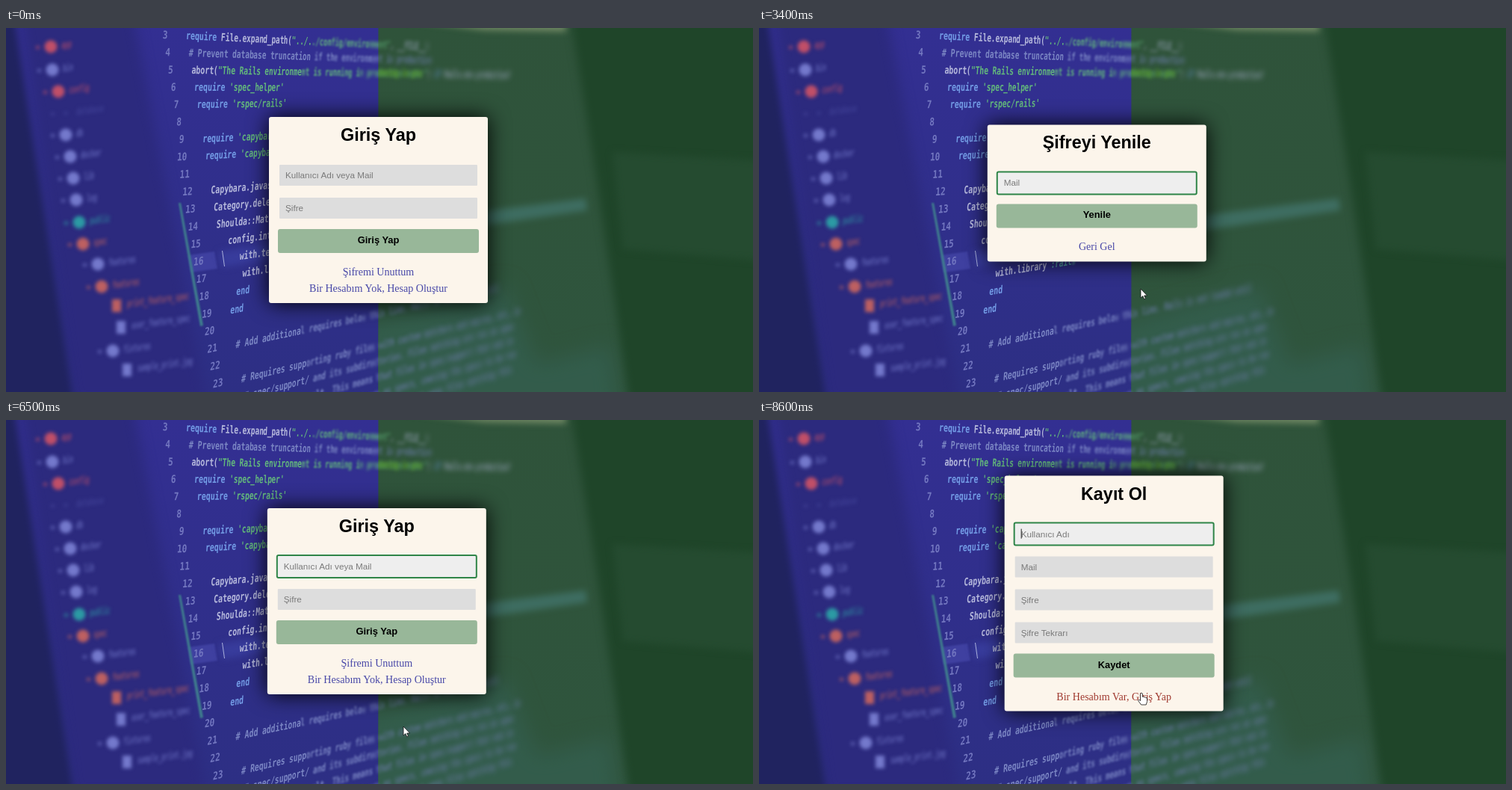
Write an HTML page with a canvas that moves like this. It is 1000x487 px and loops after 8700 ms.

```html
<!DOCTYPE html>
<html lang="tr">
<head>
<meta charset="utf-8">
<title>Giriş Yap</title>
<style>
  html, body { margin: 0; width: 100%; height: 100%; overflow: hidden; background: #2f2e88; }
  canvas { position: absolute; left: 0; top: 0; }
  .card {
    position: absolute; left: 352px; width: 293px; box-sizing: border-box; padding: 0 12px 9px;
    background: #fcf5eb; border-radius: 3px; box-shadow: 0 0 29px #000;
    font: 11.7px "Liberation Sans", Arial, sans-serif; text-align: center;
  }
  h1 { margin: 0; height: 62px; font-size: 23.4px; line-height: 49px; color: #000; }
  .field {
    position: relative; box-sizing: border-box; height: 32px; margin-bottom: 12px; padding-left: 8px;
    border: 2px solid #fcf5eb; border-radius: 3px; background: #ddd; color: #7a7a7a;
    line-height: 28px; text-align: left;
  }
  .field i { position: absolute; left: 8px; top: 7px; width: 1px; height: 13px; background: #222; visibility: hidden; }
  .button {
    height: 32px; margin-bottom: 14px; border-radius: 3px; background: #98b799;
    font-weight: bold; font-size: 12.9px; line-height: 30px; color: #000;
  }
  .link { height: 22px; font: 14.05px/22px "Liberation Serif", Times, serif; color: #4848a8; }
  #pointer { position: absolute; left: 0; top: 0; overflow: visible; }
  #pointer path { fill: #fff; stroke: #111; stroke-width: .8; stroke-linejoin: round; }
</style>
</head>
<body>
<canvas id="photo" width="1000" height="487"></canvas>
<svg id="pointer" width="14" height="18">
  <path id="arrow" d="M0 0V12.2L2.8 9.6L4.7 13.8L6.5 13L4.7 9H8.6Z"/>
  <path id="hand" d="M-1.4 1Q0-.8 1.4 1V5.4Q2.8 4.6 3.6 5.9Q5 5.2 5.7 6.5Q7.4 6 7.6 8V11.5L6.2 16H-.4L-4.4 10.6Q-4 8.4-1.4 10.6Z"/>
  <path id="beam" d="M-2-6H2M0-6V6M-2 6H2"/>
</svg>
<script>
const $ = id => document.getElementById(id);
const LOOP = 8700, SLIDE = 1970, SPLIT = 498.5;

/* ---------- backdrop ---------- */
const ctx = $('photo').getContext('2d');

function poly(color, blur, ...pts) {
  ctx.filter = blur ? `blur(${blur}px)` : 'none';
  ctx.fillStyle = color;
  ctx.beginPath();
  for (let i = 0; i < pts.length; i += 2) ctx.lineTo(pts[i], pts[i + 1]);
  ctx.fill();
}

function wash(x, top, bottom) {
  const g = ctx.createLinearGradient(0, 0, 0, 487);
  g.addColorStop(0, top);
  g.addColorStop(1, bottom);
  ctx.fillStyle = g;
  ctx.filter = 'none';
  ctx.fillRect(x, 0, 1000 - x, 487);
}

function clipRight(draw) {
  ctx.save();
  ctx.beginPath();
  ctx.rect(SPLIT, 0, 1000 - SPLIT, 487);
  ctx.clip();
  draw();
  ctx.restore();
}

function label(text, x, y, slope, width, color, blur) {
  ctx.save();
  ctx.filter = `blur(${blur}px)`;
  ctx.transform(width, width * slope, -.08, 1.2, x, y);
  ctx.font = 'bold 12px "DejaVu Sans Mono", monospace';
  ctx.textBaseline = 'middle';
  ctx.fillStyle = color;
  ctx.fillText(text, 0, 0);
  ctx.restore();
}

const code = `require File.expand_path("../../config/environment", __FILE__)
# Prevent database truncation if the environment is production
abort("The Rails environment is running in production mode!") if Rails.env.production?
require 'spec_helper'
require 'rspec/rails'

require 'capybara/rspec'
require 'capybara/rails'

Capybara.javascript_driver = :webkit
Category.delete_all; Category.generate
Shoulda::Matchers.configure do |config|
  config.integrate do |with|
    with.test_framework :rspec
    with.library :rails
  end
end

# Add additional requires below this line. Rails is not loaded until

# Requires supporting ruby files with custom matchers and macros, etc, in
# spec/support/ and its subdirectories. Files matching are run as spec
# files by default. This means that files in spec/support that end in
# will both be required and run as specs, causing the specs to be run
# twice. It is recommended that you do not name files matching this`.split('\n');

const token = /#.*|"[^"]*"|'[^']*'|(?<!:):\w+|\w+|\s+|./g;
function tint(word) {
  if (word[0] === '#') return '#7b86c4';
  if (/^["']/.test(word)) return '#63b87c';
  if (/^:\w/.test(word)) return '#58a8ac';
  return /^(require|do|end|if)$/.test(word) ? '#739ce6' : '#b6b9dc';
}

function codeLine(text, i) {
  const nx = 211 + 3.7 * i, ny = 10 + 23.4 * i, slope = .045 - .0145 * i;
  label(String(i + 3).padStart(2), nx - 8, ny, slope, .92, '#7377c0', .7);
  let col = 0;
  for (const [word] of text.matchAll(token)) {
    for (const part of word.match(/.{1,5}/g)) {
      const dx = 30 + col * (5.95 - .0115 * col);
      const x = nx + dx;
      const blur = .5 + Math.min(3, Math.max(0, x - 370) / 75);
      if (part.trim()) label(part, x, ny + slope * dx, slope, (5.95 - .021 * col) / 7.22, tint(word), blur);
      col += part.length;
    }
  }
}

const tree = [
  [60, 25, 'app', 'r'], [62, 56, 'bin', 'b'], [70, 85, 'config', 'r'], [80, 114, 'database', 'd'],
  [80, 143, 'db', 'b'], [86, 172, 'docker', 'b'], [90, 201, 'lib', 'b'], [94, 230, 'log', 'b'],
  [98, 260, 'public', 't'], [103, 289, 'spec', 'o'], [123, 316, 'features', 'b'], [128, 346, 'features', 'o'],
  [148, 371, 'print_feature_spec', 'o'], [154, 400, 'user_feature_spec', 'b'],
  [143, 432, 'fixtures', 'b'], [162, 457, 'sample_print.jpg', 'b']
];
const treeColor = { r: '#c04f68', b: '#7479cc', d: '#43459a', t: '#2c9aa4', o: '#bd6061' };

function treeRow([x, y, name, kind]) {
  const color = treeColor[kind], file = name.includes('_');
  ctx.filter = 'blur(2.8px)';
  ctx.fillStyle = color;
  ctx.beginPath();
  if (file) ctx.rect(x - 6, y - 8, 12, 17);
  else ctx.arc(x, y, kind === 'd' ? 2 : 8.5, 0, 7);
  ctx.fill();
  ctx.globalAlpha = .7;
  if (!file) ctx.fillRect(x - 20, y - 1, 5, 4);
  label(name, x + 14, y - 1, -.13, .64, color, 2);
  ctx.globalAlpha = 1;
}

function paintPhoto() {
  wash(0, '#332f92', '#2d2f84');
  poly('#2c2a7e', 8, 20, -20, 170, -20, 268, 500, 90, 500);
  poly('#20235f', 5, -20, -20, 10, -20, 92, 510, -20, 510);
  poly('#3f40a0', 1, 244, 304, 279, 299, 283, 322, 247, 327);
  poly('#383c9c', 5, 285, 300, 510, 263, 510, 281, 290, 320);
  poly('#3f7d8d', .8, 231, 234, 234, 234, 264, 398, 260, 399);
  tree.forEach(treeRow);

  wash(SPLIT, '#30543a', '#30563f');
  clipRight(() => {
    poly('#467a74', 4, 480, 265, 776, 228, 778, 244, 480, 287);
    poly('#356154', 14, 470, 400, 670, 345, 710, 450, 810, 425, 820, 520, 470, 520);
  });
  code.forEach(codeLine);
  poly('#aab0dc', .5, 289, 298, 290, 298, 293, 319, 292, 319);
  clipRight(() => {
    poly('rgba(48,84,60,.33)', 0, 490, 0, 1000, 0, 1000, 487, 490, 487);
    label('running in pro', 494, 60, .03, .62, '#5aa327', 2.8);
    poly('#1f4529', 6, 755, -20, 1020, -20, 1020, 510, 836, 510, 790, 200);
    poly('#254b30', 5, 812, 166, 1020, 178, 1020, 312, 826, 296);
    poly('#6f8763', 4, 520, -12, 748, -12, 750, 5, 640, 3);
  });
}

/* ---------- cards ---------- */
function makeCard(title, fields, button, links) {
  const el = document.createElement('div');
  el.className = 'card';
  const row = (cls, text) => `<div class="${cls}">${text}</div>`;
  el.innerHTML = `<h1>${title}</h1>` +
    fields.map(f => row('field', f + '<i></i>')).join('') +
    row('button', button) + links.map(l => row('link', l)).join('');
  document.body.insertBefore(el, $('pointer'));
  const all = s => [...el.querySelectorAll(s)];
  return {
    el, fields: all('.field'), button: all('.button')[0], links: all('.link'),
    top: (487 - (117 + 44 * fields.length + 22 * links.length)) / 2
  };
}

const login = makeCard('Giriş Yap', ['Kullanıcı Adı veya Mail', 'Şifre'], 'Giriş Yap',
  ['Şifremi Unuttum', 'Bir Hesabım Yok, Hesap Oluştur']);
const renew = makeCard('Şifreyi Yenile', ['Mail'], 'Yenile', ['Geri Gel']);
const register = makeCard('Kayıt Ol', ['Kullanıcı Adı', 'Mail', 'Şifre', 'Şifre Tekrarı'], 'Kaydet',
  ['Bir Hesabım Var, Giriş Yap']);
const cards = [login, renew, register];

// from: first shown; start: slide begins; focus: [time, field]; hover: [from, to, link]
const scenes = [
  { card: login, from: 0, start: -SLIDE, focus: [[600, 0], [1200, 1]], hover: [2000, 2400, 0] },
  { card: renew, from: 2400, start: 2390, focus: [[2390, 0]], hover: [4400, 4900, 0] },
  { card: login, from: 4900, start: 4772, focus: [[4772, 0]], hover: [6900, 7500, 1] },
  { card: register, from: 7500, start: 7352, focus: [[7352, 0]], hover: [8300, LOOP, 0] }
];

// time, x, y, shape
const moves = [
  [100, 645, 262, 'arrow'], [500, 560, 198, 'beam'], [1000, 560, 200, 'beam'], [1200, 556, 241, 'beam'],
  [1500, 535, 284, 'hand'], [1700, 530, 286, 'hand'], [2000, 485, 332, 'hand'], [2700, 485, 332, 'hand'],
  [2800, 490, 338, 'arrow'], [3400, 511, 349, 'arrow'], [4000, 514, 360, 'arrow'], [4400, 511, 323, 'hand'],
  [5000, 511, 323, 'hand'], [5100, 515, 335, 'arrow'], [5800, 533, 405, 'arrow'], [6500, 532, 410, 'arrow'],
  [6900, 518, 352, 'hand'], [7200, 517, 352, 'hand'], [7500, 516, 371, 'arrow'], [8100, 513, 367, 'arrow'],
  [8300, 512, 365, 'hand'], [LOOP, 512, 365, 'hand']
];

const clamp = v => Math.min(1, Math.max(0, v));
const mix = (a, b, k) => `rgb(${a.map((v, i) => v + (b[i] - v) * k)})`;

// cubic-bezier(.25, .1, .25, 1)
function ease(x) {
  if (x <= 0 || x >= 1) return clamp(x);
  let lo = 0, hi = 1, s;
  for (let i = 0; i < 24; i++) {
    s = (lo + hi) / 2;
    if (.75 * s * (1 - s) + s ** 3 < x) lo = s; else hi = s;
  }
  return .3 * s * (1 - s) ** 2 + 3 * s * s * (1 - s) + s ** 3;
}

function drawCard(t) {
  const scene = scenes.findLast(s => t >= s.from), { card } = scene;
  for (const c of cards) c.el.style.display = c === card ? 'block' : 'none';
  const rest = 1 - ease((t - scene.start) / SLIDE);
  card.el.style.top = card.top + 'px';
  card.el.style.transform = `translate(${-249.5 * rest}px, ${-121.75 * rest}px)`;

  const active = scene.focus.findLast(f => t >= f[0]);
  card.fields.forEach((field, i) => {
    const on = active && active[1] === i, age = on ? t - active[0] : 0;
    const k = clamp(age / 200);
    field.style.borderColor = mix([252, 245, 235], [47, 133, 72], k);
    field.style.backgroundColor = mix([221, 221, 221], [238, 238, 238], k);
    field.lastChild.style.visibility = on && age % 1060 < 530 ? 'visible' : 'hidden';
  });
  card.button.style.backgroundColor = scene === scenes[0] && t >= 1500 && t < 1900 ? '#7fa983' : '';
  const [a, b, n] = scene.hover;
  card.links.forEach((link, i) => link.style.color = i === n && t >= a && t < b ? '#a03a30' : '');
}

function drawPointer(t) {
  const i = moves.findLastIndex(m => t >= m[0]);
  $('pointer').style.display = i < 0 ? 'none' : 'block';
  if (i < 0) return;
  const [t0, x0, y0, shape] = moves[i], [t1, x1, y1] = moves[i + 1];
  const k = (t - t0) / (t1 - t0);
  $('pointer').style.transform = `translate(${x0 + (x1 - x0) * k}px, ${y0 + (y1 - y0) * k}px)`;
  for (const id of ['arrow', 'hand', 'beam']) $(id).style.display = id === shape ? '' : 'none';
}

function tick(now) {
  const t = Math.floor(now % LOOP / 100) * 100;
  drawCard(t);
  drawPointer(t);
  requestAnimationFrame(tick);
}

paintPhoto();
requestAnimationFrame(tick);
</script>
</body>
</html>
```
